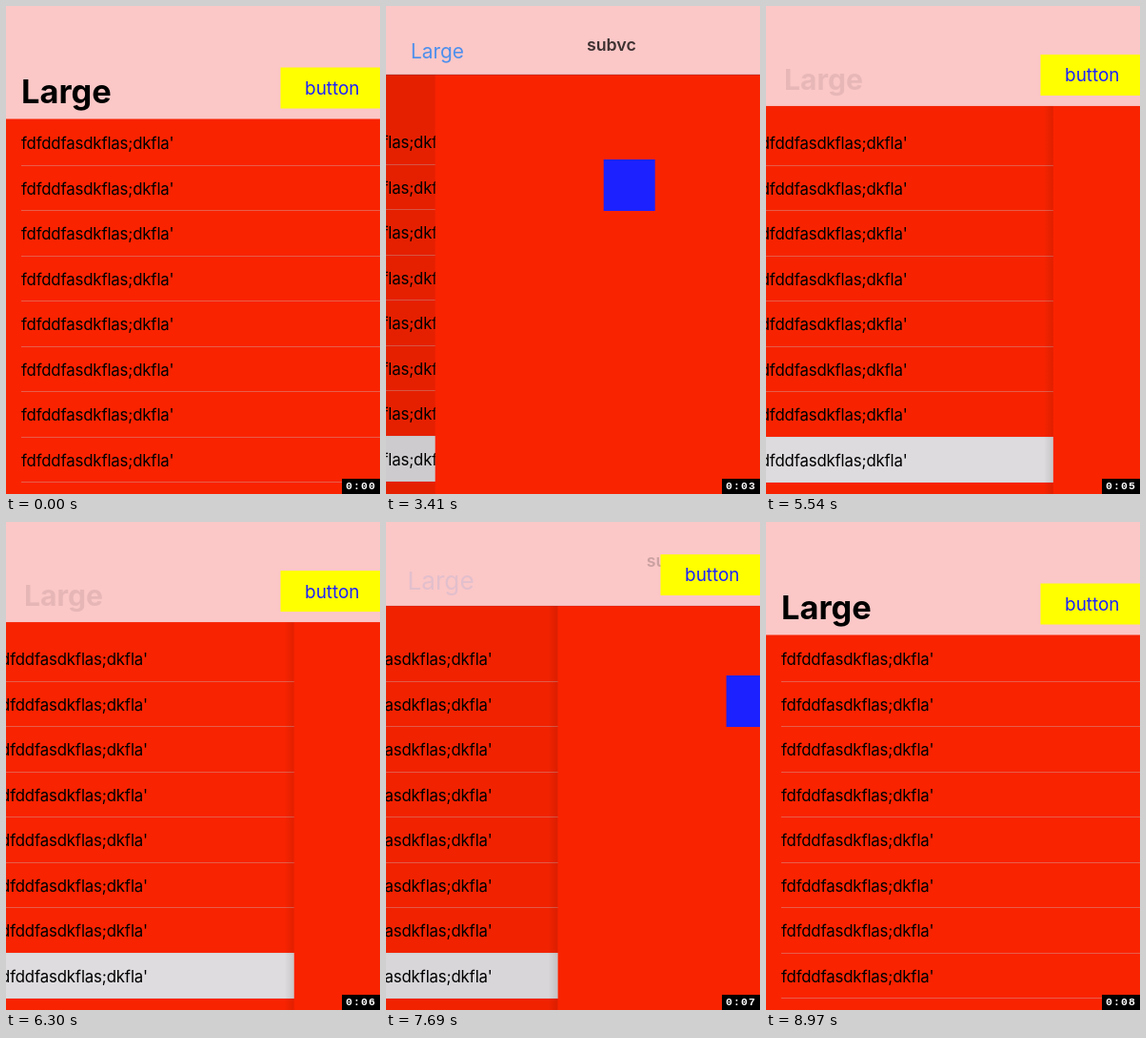
These frames come from a looping animation (393 by 512 pixels, 9.07 s). An HTML page:

```html
<!DOCTYPE html>
<html lang="en">
<head>
<meta charset="utf-8">
<title>Large title navigation</title>
<style>
  html, body { margin: 0; width: 100%; height: 100%; overflow: hidden; background: #f92300; }
  svg { display: block; width: 100vw; height: 100vh; font-family: Inter, Roboto, sans-serif; }
  .row { font-size: 16.8px; letter-spacing: -.16px; }
  .line { fill: #c8c7cc; opacity: .36; shape-rendering: crispEdges; }
  .accent { fill: #1b22ff; }
  .tint { fill: #3d8af0; }
  .clock { font: bold 11.5px "Liberation Mono", monospace; letter-spacing: 1.1px; fill: #fff; }
</style>
</head>
<body>
<svg viewBox="0 0 393 512">
  <defs>
    <linearGradient id="shade">
      <stop offset="0" stop-opacity="0"/>
      <stop offset="1" stop-opacity=".1"/>
    </linearGradient>
  </defs>
  <rect width="393" height="512" fill="#f92300"/>
  <g id="list">
    <rect id="selected" y="452" width="393" height="48" fill="#dfdde0"/>
  </g>
  <rect id="dim" width="393" height="512"/>
  <g id="detail">
    <rect id="shadow" x="-10" width="10" height="512" fill="url(#shade)"/>
    <rect width="393" height="512" fill="#f92300"/>
    <rect class="accent" x="177" y="161" width="54" height="54"/>
  </g>
  <rect id="bar" width="393" fill="#fbc7c7"/>
  <rect id="hairline" width="393" height="1"/>
  <text id="title" y="47" font-size="17.8" font-weight="600" text-anchor="middle">subvc</text>
  <path id="chevron" d="M21 31.500L11.500 41L21 50.500" fill="none" stroke="#3d8af0" stroke-width="3"/>
  <text id="back" class="tint">Large</text>
  <text id="large" font-weight="700">Large</text>
  <g id="button">
    <rect x="288.500" width="105" height="43" fill="#ff0"/>
    <text class="accent" x="342.800" y="28.500" font-size="18.9" text-anchor="middle">button</text>
  </g>
  <path id="cursor" d="M0 0V16L4 12.500L7 19L9.500 18L6.500 12H11.500Z" stroke="#fff"/>
  <rect x="353" y="496" width="40" height="16"/>
  <text id="clock" class="clock" x="357" y="507"></text>
</svg>
<script>
const LOOP = 9070, WIDTH = 393;
const PUSH = 3080, SWIPE = 4830, POPPED = 8250;
const ROWS = 8, PITCH = 47.5;
const TICKS = [980, 1980, 2980, 4180, 5000, 6000, 7000, 8000];

// Left edge of the detail screen while a finger drags it: [ms, px].
const DRAG = [
  [4830, 7], [5250, 190], [5650, 335], [5850, 350], [6300, 303], [6660, 135],
  [6950, 10], [7100, 0], [7400, 8], [7690, 180], [7950, 335], [POPPED, WIDTH]
];

const el = {};
document.querySelectorAll('svg [id]').forEach(node => el[node.id] = node);
const set = (node, attrs) => {
  for (const key in attrs) node.setAttribute(key, attrs[key]);
};
const add = (parent, tag, attrs, text = '') => {
  const node = document.createElementNS('http://www.w3.org/2000/svg', tag);
  set(node, attrs);
  node.textContent = text;
  parent.append(node);
};
const clamp = (v, lo = 0, hi = 1) => Math.min(hi, Math.max(lo, v));
const show = (node, on) => set(node, { display: on ? 'inline' : 'none' });

for (let i = 0; i < ROWS; i++) {
  add(el.list, 'text', { class: 'row', x: 16, y: 150 + PITCH * i }, "fdfddfasdkflas;dkfla'");
  add(el.list, 'rect', { class: 'line', x: 16, y: Math.floor(167 + PITCH * i), width: WIDTH, height: 1 });
}

function spline(points, t) {
  const last = points.length - 1;
  const i = clamp(points.findIndex(p => p[0] > t) - 1, 0, last - 1);
  const slope = k => {
    const a = points[Math.max(0, k - 1)], b = points[Math.min(last, k + 1)];
    return (b[1] - a[1]) / (b[0] - a[0]);
  };
  const [t0, v0] = points[i], [t1, v1] = points[i + 1];
  const span = t1 - t0, u = (t - t0) / span, w = 1 - u;
  return v0 * w * w * (1 + 2 * u) + v1 * u * u * (3 - 2 * u)
    + span * u * w * (slope(i) * w - slope(i + 1) * u);
}

function edgeAt(t) {
  if (t < PUSH || t >= POPPED) return WIDTH;
  if (t >= SWIPE) return clamp(spline(DRAG, t), 0, WIDTH);
  const s = (t - PUSH) * .0107;
  const rest = WIDTH * Math.exp(-s) * (1 + s);
  return rest < 1 ? 0 : rest;
}

function listShift(t) {
  if (t >= 500 && t < SWIPE) return -1;
  return t >= SWIPE && t < 5000 ? 1 : 0;
}

function draw(t) {
  const swiping = t >= SWIPE;
  const edge = edgeAt(t), open = edge / WIDTH;
  // The bar trails the finger slightly during a swipe.
  const p = open - (swiping ? .12 : 0) * open * (1 - open);
  const height = 65 + 53.5 * p;
  const scale = 48 + 46 * p;
  const label = { x: 27.5 - 11.5 * p, y: 48 + 53.6 * p };

  set(el.list, { transform: `translate(${-.305 * (WIDTH - edge)} ${listShift(t)})` });
  set(el.selected, { opacity: t < 2970 ? 0 : clamp((8500 - t) / 250) });
  set(el.dim, { opacity: .11 * (1 - open) ** 2 });
  set(el.detail, { transform: `translate(${edge})` });
  show(el.detail, edge < WIDTH);
  show(el.shadow, swiping);

  set(el.bar, { height });
  set(el.hairline, { y: height - .5, opacity: .3 * (1 - p) ** 2 });
  set(el.title, { x: 196.5 + 185 * open ** .75, opacity: clamp(1 - 1.9 * p) });
  set(el.chevron, { opacity: clamp(1 - p * 12) });
  set(el.back, { ...label, 'font-size': 18.5 * scale / 48, opacity: clamp(1 - (p / .46) ** 2) });
  set(el.large, { ...label, 'font-size': 34.4 * scale / 94, opacity: clamp((p - .65) / .35) ** 2 });
  set(el.button, { transform: `translate(0 ${height - 54})` });
  show(el.button, t < PUSH || swiping);

  const u = (t - 1520) / 210;
  show(el.cursor, u >= 0 && u < 1);
  set(el.cursor, { transform: `translate(${313.5 + 36 * u} ${498.5 - 16 * Math.sin(u * 2.5)})` });
  el.clock.textContent = '0:0' + TICKS.filter(tick => t >= tick).length;
}

const start = performance.now();
function frame() {
  draw((performance.now() - start) % LOOP);
  requestAnimationFrame(frame);
}
frame();
</script>
</body>
</html>
```
